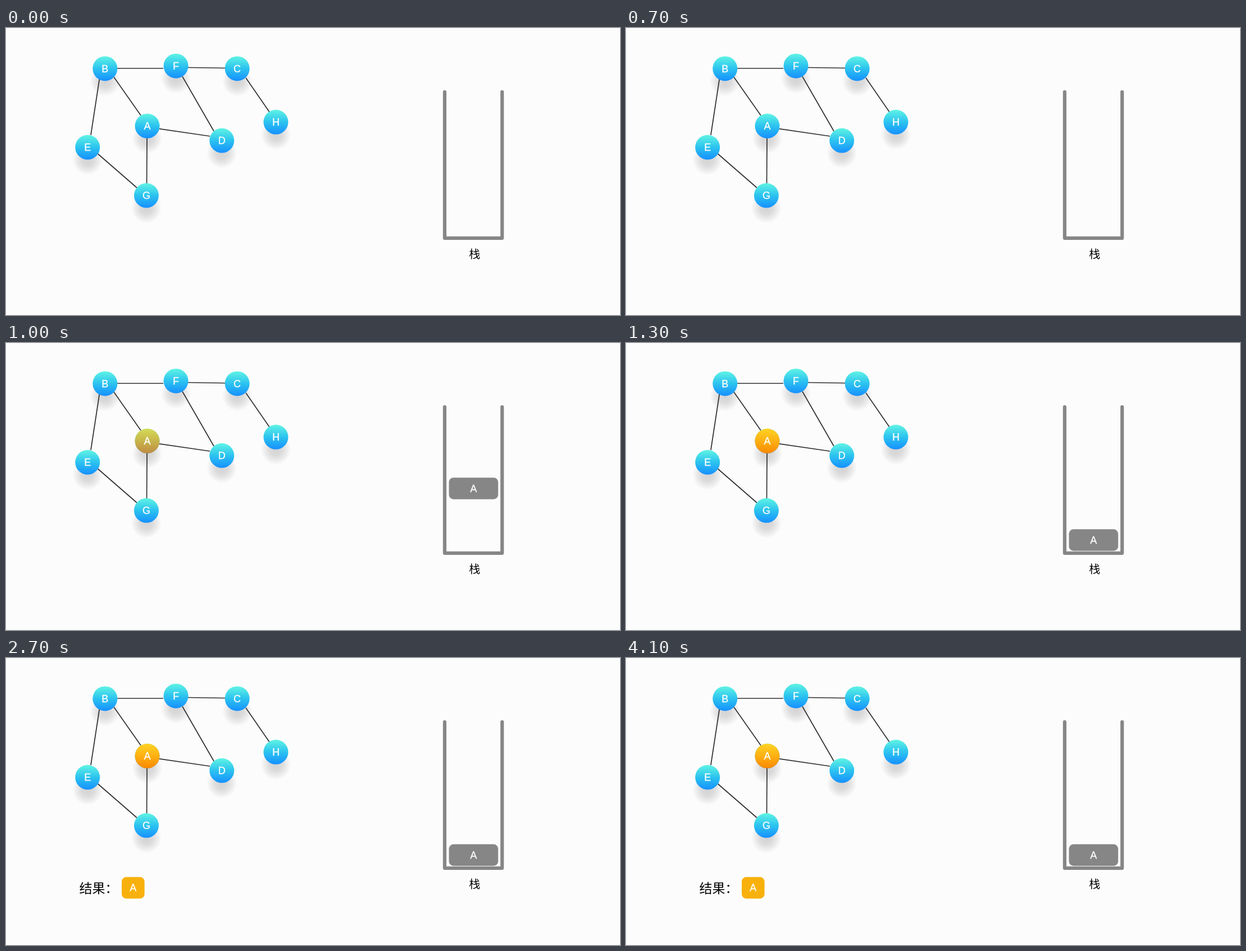
An HTML page with a canvas that plays this animation: 1093x512 px, repeating every 4.2 s.

```html
<!DOCTYPE html>
<html lang="zh-CN">
<head>
<meta charset="utf-8">
<title>Graph traversal with a stack</title>
<style>
html, body { margin: 0; width: 100%; height: 100%; overflow: hidden; background: #fcfcfc; }
canvas { display: block; }
</style>
</head>
<body>
<canvas id="stage" width="1093" height="512"></canvas>
<script>
const ctx = document.getElementById('stage').getContext('2d');
const LOOP = 4200, STEP = 100;
const LATIN = '"Liberation Sans", Arial, sans-serif';
const CJK = '"Noto Sans CJK SC", "Noto Sans CJK", sans-serif';
const GREY = '#868686';
const BLUE = ['#60f4e4', '#2cc3ef', '#1690ff'];
const ORANGE = ['#fed325', '#fdb012', '#fb8900'];

const nodes = {
  B: [176.3, 72.4], F: [302.5, 67.7], C: [411.6, 72.4], H: [480.4, 167.8],
  A: [251.5, 174.8], D: [384.2, 200.8], E: [145.2, 212.8], G: [249.9, 298.8]
};
const edges = [
  [198, 72, 280, 72], [324, 70.5, 390, 71.5], [427, 89, 469, 150],
  [166.3, 91, 151, 191], [192, 87.5, 240, 156], [314, 86.5, 370, 184],
  [273, 179.8, 363, 193], [251, 196, 250.5, 277], [163.5, 224.5, 233, 285]
];

const progress = (t, from, to) => Math.min(1, Math.max(0, (t - from) / (to - from)));
const ease = p => (1 - Math.cos(Math.PI * p)) / 2;

function text(s, x, y, font, color, align = 'center') {
  ctx.font = font;
  ctx.fillStyle = color;
  ctx.textAlign = align;
  ctx.fillText(s, x, y);
}

function letter(s, x, y) {
  text(s, x, y + 6.3, '18px ' + LATIN, '#fff');
  ctx.strokeStyle = '#fff';
  ctx.lineWidth = 0.3;
  ctx.strokeText(s, x, y + 6.3);
}

function shadow([x, y]) {
  const g = ctx.createRadialGradient(x, y + 22.5, 0, x, y + 22.5, 27);
  g.addColorStop(0, 'rgba(0,0,0,.16)');
  g.addColorStop(0.4, 'rgba(0,0,0,.135)');
  g.addColorStop(0.75, 'rgba(0,0,0,.06)');
  g.addColorStop(1, 'rgba(0,0,0,0)');
  ctx.fillStyle = g;
  ctx.fillRect(x - 28, y - 6, 56, 56);
}

function disc([x, y], colors, alpha = 1) {
  const g = ctx.createLinearGradient(0, y - 22, 0, y + 22);
  colors.forEach((c, i) => g.addColorStop(i / 2, c));
  ctx.globalAlpha = alpha;
  ctx.fillStyle = g;
  ctx.beginPath();
  ctx.arc(x, y, 22, 0, Math.PI * 2);
  ctx.fill();
  ctx.globalAlpha = 1;
}

function tile(x, y, w, h, color) {
  ctx.fillStyle = color;
  ctx.beginPath();
  ctx.roundRect(x - w / 2, y - h / 2, w, h, 8);
  ctx.fill();
  letter('A', x, y);
}

function drawGraph(visited) {
  Object.values(nodes).forEach(shadow);
  ctx.strokeStyle = '#303030';
  ctx.lineWidth = 1.7;
  ctx.lineCap = 'butt';
  ctx.beginPath();
  for (const [x1, y1, x2, y2] of edges) {
    ctx.moveTo(x1, y1);
    ctx.lineTo(x2, y2);
  }
  ctx.stroke();
  for (const [name, pos] of Object.entries(nodes)) {
    disc(pos, BLUE);
    if (name === 'A' && visited > 0) disc(pos, ORANGE, visited);
    letter(name, ...pos);
  }
}

function drawStack() {
  ctx.strokeStyle = GREY;
  ctx.lineWidth = 6.2;
  ctx.lineCap = ctx.lineJoin = 'round';
  ctx.beginPath();
  ctx.moveTo(780.9, 114.2);
  ctx.lineTo(780.9, 374.8);
  ctx.lineTo(883.2, 374.8);
  ctx.lineTo(883.2, 114.2);
  ctx.stroke();
  text('栈', 834.2, 410.5, '20px ' + CJK, '#000');
}

function draw(t) {
  ctx.fillStyle = '#fcfcfc';
  ctx.fillRect(0, 0, 1093, 512);
  const drop = ease(progress(t, 700, 1200));
  drawGraph(Math.pow(drop, 0.7));
  drawStack();

  ctx.globalAlpha = progress(t, 700, 900);
  if (t > 700) tile(832.3, 85 + 266.5 * drop, 87.6, 38.4, GREY);

  ctx.globalAlpha = progress(t, 2500, 2700);
  if (t > 2500) {
    text('结果：', 130.5, 418.5, '500 23px ' + CJK, '#000', 'left');
    tile(226.3, 410, 40.6, 38.4, '#f8b10c');
  }
  ctx.globalAlpha = 1;
}

const start = performance.now();
function tick() {
  const t = (performance.now() - start) % LOOP;
  draw(Math.floor(t / STEP) * STEP);
  requestAnimationFrame(tick);
}
tick();
</script>
</body>
</html>
```
